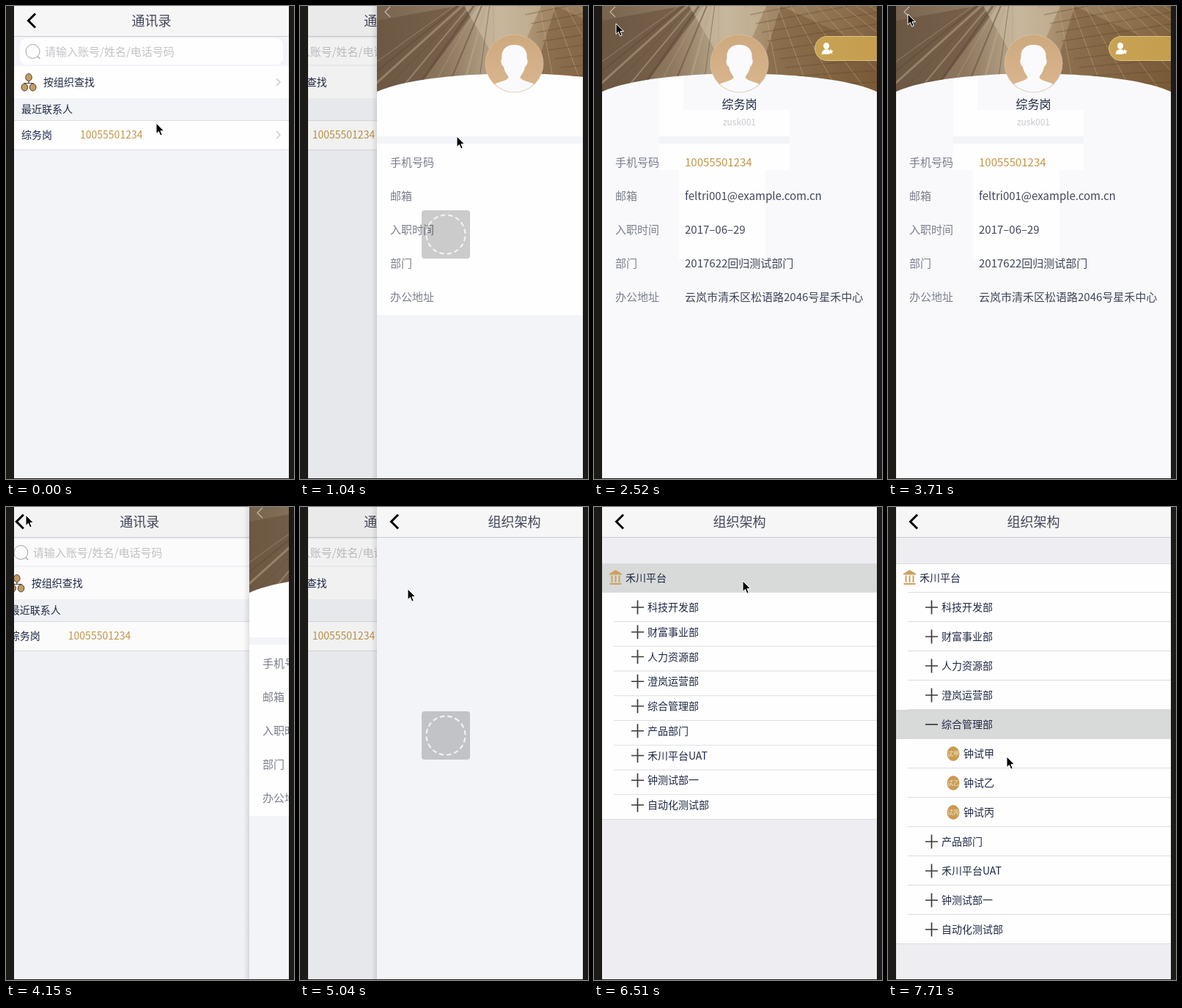
An HTML page for the animation above (8 s loop, 393 by 646 pixels).

```html
<!DOCTYPE html>
<html lang="zh-CN">
<head>
<meta charset="utf-8">
<title>通讯录</title>
<style>
  html, body { margin: 0; width: 100%; height: 100%; overflow: hidden; background: #1d1b18; }
  svg { display: block; width: 393px; height: 646px; }
  text { font-family: "Noto Sans CJK SC", "Noto Sans CJK", "Noto Sans", sans-serif; white-space: pre; }
</style>
</head>
<body>
<svg viewBox="0 0 393 646">
  <defs>
    <clipPath id="screen"><rect x="11" width="375" height="645"/></clipPath>
    <clipPath id="arc"><path d="M11 0V117C81 84 316 84 386 117V0Z"/></clipPath>
    <clipPath id="face"><circle cx="198.500" cy="78.500" r="39"/></clipPath>
    <linearGradient id="photo">
      <stop offset="0" stop-color="#77634e"/>
      <stop offset=".25" stop-color="#8d775e"/>
      <stop offset=".45" stop-color="#bba98d"/>
      <stop offset=".6" stop-color="#a48a69"/>
      <stop offset="1" stop-color="#80623f"/>
    </linearGradient>
    <linearGradient id="gold"><stop stop-color="#c9a354"/><stop offset="1" stop-color="#c39b4c"/></linearGradient>
    <linearGradient id="skin" x2="0" y2="1"><stop stop-color="#cea97e"/><stop offset="1" stop-color="#dab690"/></linearGradient>
    <linearGradient id="edge"><stop stop-opacity="0"/><stop offset="1" stop-opacity=".1"/></linearGradient>
  </defs>
  <g id="stage" clip-path="url(#screen)"></g>
</svg>
<script>
const LOOP = 8000, STEP = 148, LEAD = 4, WIDTH = 375;
const INK = '#1f2945', GOLD = '#c2954a', LINE = '#dcdde1';
const PHONE = '10055501234', POST = '综务岗';

// Keyframes: step, then one or more values
const profileKeys = [[5, 375], [6, 300], [7, 94], [8, 12], [9, 0], [26, 0], [27, 190], [28, 321], [29, 363], [30, 375]];
const orgKeys = [[32, 375], [33, 300], [34, 94], [35, 12], [36, 0]];
const rootKeys = [[42, 0], [43, .45], [44, .84375], [45, 1]];
const teamKeys = [[49, 0], [50, .6], [51, .93], [52, 1]];
const cursorKeys = [[0, 205, 160], [1, 216, 135], [2, 234, 94], [3, 226, 150], [4, 214, 178], [8, 214, 178],
  [10, 171, 149], [11, 117, 160], [12, 254, 143], [13, 108, 204], [14, 90, 97], [15, 52, 52], [16, 36, 31],
  [17, 30, 24], [19, 30, 24], [20, 28, 20], [21, 28, 18], [24, 28, 18], [25, 27, 11], [28, 27, 11],
  [30, 112, 90], [31, 147, 112], [36, 147, 112], [40, 205, 106], [43, 203, 101], [45, 203, 101],
  [48, 158, 292], [50, 158, 292], [52, 162, 341]];

function at(keys, n) {
  const i = keys.findIndex(k => k[0] >= n);
  if (i < 0) return keys[keys.length - 1].slice(1);
  if (i === 0) return keys[0].slice(1);
  const a = keys[i - 1], b = keys[i], f = (n - a[0]) / (b[0] - a[0]);
  return a.slice(1).map((v, j) => v + (b[j + 1] - v) * f);
}

const rect = (x, y, w, h, fill, more = '') =>
  `<rect x="${x}" y="${y}" width="${w}" height="${h}" fill="${fill}" ${more}/>`;
const path = (d, stroke, width, more = '') =>
  `<path d="${d}" fill="none" stroke="${stroke}" stroke-width="${width}" ${more}/>`;
const shape = (d, fill, more = '') => `<path d="${d}" fill="${fill}" ${more}/>`;
const oval = (x, y, rx, ry, fill, more = '') =>
  `<ellipse cx="${x}" cy="${y}" rx="${rx}" ry="${ry}" fill="${fill}" ${more}/>`;
const text = (x, mid, size, fill, str, anchor = 'start') =>
  `<text x="${x}" y="${mid + size * .37}" font-size="${size}" fill="${fill}" text-anchor="${anchor}">${str}</text>`;
const move = (x, y, body) => `<g transform="translate(${x} ${y})">${body}</g>`;

const header = title => rect(11, 0, WIDTH, 41, '#f6f6f6') + rect(11, 41, WIDTH, 1, '#cbcbce') +
  path('M40 10.500L30.500 20L40 29.500', '#000', 3) + text(198.5, 20, 18, '#43465a', title, 'middle');

function listPage() {
  const arrow = y => path(`M369 ${y - 5}l5 5l-5 5`, '#c6c7cc', 1.3);
  const node = (x, y) => oval(x, y, 4.3, 5, '#c69c62', 'stroke="#4a4238"');
  return rect(11, 0, WIDTH, 645, '#f2f4f8') + header('通讯录') +
    rect(19, 44, 359, 36, '#fefefe', 'rx="9"') +
    oval(36.5, 62, 9.5, 9.5, 'none', 'stroke="#a3a3a8"') + path('M43 69l3.500 3', '#a3a3a8', 1.2) +
    text(53, 62, 15, '#c4c4c8', '请输入账号/姓名/电话号码') +
    rect(11, 82, WIDTH, 44, '#fefefe') +
    path('M31 103v3M25 108v-2.500h12v2.500', '#4a4238', 1.2) + node(31, 97.5) + node(25.3, 111) + node(36.7, 111) +
    text(51, 104, 14, INK, '按组织查找') + arrow(104) +
    text(21, 141, 14, INK, '最近联系人') +
    rect(11, 156, WIDTH, 41, LINE) + rect(11, 157, WIDTH, 39, '#fefefe') +
    text(21, 176, 14, INK, POST) + text(101, 176, 14, GOLD, PHONE) + arrow(176);
}

// Towers seen from below, as flat wedges and fanned beams
function photo() {
  let beams = shape('M11 20L120 0H150L75 100L11 117Z', '#66503c', 'opacity=".6"') +
    shape('M130 0H235L215 45L165 60Z', '#cfc0a5', 'opacity=".6"') +
    shape('M255 0L386 60V117L225 95Z', '#70502f', 'opacity=".45"');
  for (let i = 0; i < 11; i++) {
    beams += path(`M${130 + i * 4} -10L${-50 + i * 22} 120`, i % 2 ? '#5b4836' : '#bda88a', i % 3 + 1, 'opacity=".5"');
    beams += path(`M${215 + i * 16} -10L${215 + i * 40} 120`, '#d0b28a', 1, 'opacity=".45"');
    beams += path(`M${205 + i * 8} ${i * 12}L390 ${i * 16 - 40}`, '#59422f', 1.5, 'opacity=".35"');
  }
  return `<g clip-path="url(#arc)">${rect(11, 0, WIDTH, 120, 'url(#photo)')}${beams}</g>`;
}

function avatar() {
  return oval(198.5, 78.5, 39.5, 39.5, 'url(#skin)', 'stroke="#dcc9b3" stroke-width=".6"') +
    `<g clip-path="url(#face)" fill="#fafafc"><path d="M198.500 53C210 53 217 60 215.500 72C218 74 216 82 213 83
      C212 90 208 94 206.500 97C207 103 224 103 229 110V120H168V110C173 103 190 103 190.500 97
      C189 94 185 90 184 83C181 82 179 74 181.500 72C180 60 187 53 198.500 53Z"/></g>`;
}

function profilePage(n) {
  const loaded = n >= 10, flat = loaded && n < 27;
  const fields = [['手机号码', PHONE], ['邮箱', 'feltri001@example.com.cn'], ['入职时间', '2017–06–29'],
    ['部门', '2017622回归测试部门'], ['办公地址', '云岚市清禾区松语路2046号星禾中心']];
  let body = rect(11, 0, WIDTH, 645, flat ? '#f9f9fb' : '#f2f4f8');
  if (flat) {
    if (n >= 11) body += rect(116, 149, 118, 197, '#fefefe');
    if (n >= 13) body += rect(108, 142, 159, 82, '#fefefe');
    if (n >= 14) body += rect(89, 96, 33, 128, '#fefefe') + rect(89, 178, 178, 10, '#f3f4f8');
  } else {
    body += rect(11, 0, WIDTH, 178, '#fefefe') + rect(11, 188, WIDTH, 234, '#fefefe');
  }
  body += photo() + path('M29 1L22 8L29 15', '#e6dccd', 1.2, 'opacity=".7"') +
    rect(301.5, 41.5, 110, 33, 'url(#gold)', 'rx="16.500" stroke="#dfc383"') +
    oval(317, 54.5, 4, 4.6, '#fff') + shape('M310.500 66q0-6 6.500-7q3 0 4.500 2l-1 5z', '#fff') +
    shape('M323 58.500l1.200 2.400l2.600.3l-2 1.800l.6 2.700l-2.400-1.400l-2.400 1.400l.6-2.700l-2-1.800l2.600-.3z', '#fff') +
    avatar();
  if (loaded) body += text(198.5, 134, 16, INK, POST, 'middle') + text(198.5, 158.5, 12, '#c8c9cf', 'zusk001', 'middle');
  fields.forEach(([label, value], i) => {
    const y = 213 + i * 46;
    body += text(29, y, 15, '#7b7f8e', label);
    if (loaded) body += text(124, y, 15, i ? '#41465a' : GOLD, value);
  });
  return body;
}

function treeRow(top, x, label, icon, pressed) {
  return move(0, top, rect(11, 0, WIDTH, 40, pressed ? '#d8d9d9' : '#fefefe') +
    rect(27, 39, 359, 1, LINE) + icon + text(x, 20, 14, INK, label));
}

function tree(n) {
  const [open] = at(rootKeys, n), [team] = at(teamKeys, n);
  const bank = shape('M21 15.500V14L29.500 9L38 14V15.500ZM21.500 27H37.500V29H21.500Z', '#cba25b') +
    path('M24.500 16.500v9.500M29.500 16.500v9.500M34.500 16.500v9.500', '#cba25b', 2);
  const plus = path('M51 20h17M59.500 10.500v19', '#3a3a3c', 1.7), minus = path('M51 20h17', '#3a3a3c', 1.7);
  const rows = [treeRow(77, 43, '禾川平台', bank, n >= 42 && n <= 44)];
  let end = 117;
  if (open) {
    const units = ['科技开发部', '财富事业部', '人力资源部', '澄岚运营部', '综合管理部', '产品部门', '禾川平台UAT', '钟测试部一', '自动化测试部'];
    units.forEach((unit, i) => {
      const top = 117 + i * 40 * open + (i > 4 ? 120 * team : 0);
      rows.push(treeRow(top, 73, unit, i === 4 && team ? minus : plus, i === 4 && n >= 49));
      if (i === 4 && team) ['试甲', '试乙', '试丙'].forEach((name, j) => {
        const badge = oval(89, 20, 8.5, 10, '#c99c52') + text(89, 20, 8, '#f6ead3', name, 'middle');
        rows.push(treeRow(317 + j * 40 * team, 103, '钟' + name, badge));
      });
      end = top + 40;
    });
  }
  return rect(11, 42, WIDTH, 603, '#eeeef2') + rows.reverse().join('') +
    rect(11, 77, WIDTH, 1, LINE) + rect(11, end - 1, WIDTH, 1, LINE);
}

const orgPage = n => rect(11, 0, WIDTH, 645, '#f2f4f8') + (n >= 38 ? tree(n) : '') + header('组织架构');

function spinner(n, fading) {
  const scale = fading ? 1.06 : 1;
  return `<g transform="translate(199 312) scale(${scale})" opacity="${fading ? .6 : 1}">` +
    rect(-33, -33, 66, 66, '#000', 'rx="4" opacity=".2"') +
    oval(0, 0, 26.5, 26.5, 'none', `stroke="#f2f2f3" stroke-width="2.2" stroke-dasharray="6.300 3.950" transform="rotate(${n * 30})"`) + '</g>';
}

function render(n) {
  const [profileX] = at(profileKeys, n), [orgX] = at(orgKeys, n);
  const x = Math.min(profileX, orgX), cover = 1 - x / WIDTH;
  let out = move(-.3 * WIDTH * cover, 0, listPage());
  if (cover) {
    out += rect(11, 0, WIDTH, 645, '#000', `opacity="${.07 * cover}"`);
    out += move(x, 0, rect(3, 0, 8, 645, 'url(#edge)') + (n < 32 ? profilePage(n) : orgPage(n)));
  }
  if (n >= 6 && n <= 10) out += spinner(n, n === 10);
  if (n >= 33 && n <= 38) out += spinner(n, n === 38);
  const [cx, cy] = at(cursorKeys, n);
  return out + move(cx, cy,
    shape('M0 0V14.500L3.400 11.400L5.700 17L8.200 16L5.900 10.600H10.500Z', '#000', 'stroke="#fff"'));
}

const stage = document.getElementById('stage');
let shown = -1;
function tick() {
  const n = Math.floor((performance.now() % LOOP + LEAD) / STEP);
  if (n !== shown) stage.innerHTML = render(shown = n);
  requestAnimationFrame(tick);
}
tick();
</script>
</body>
</html>
```
